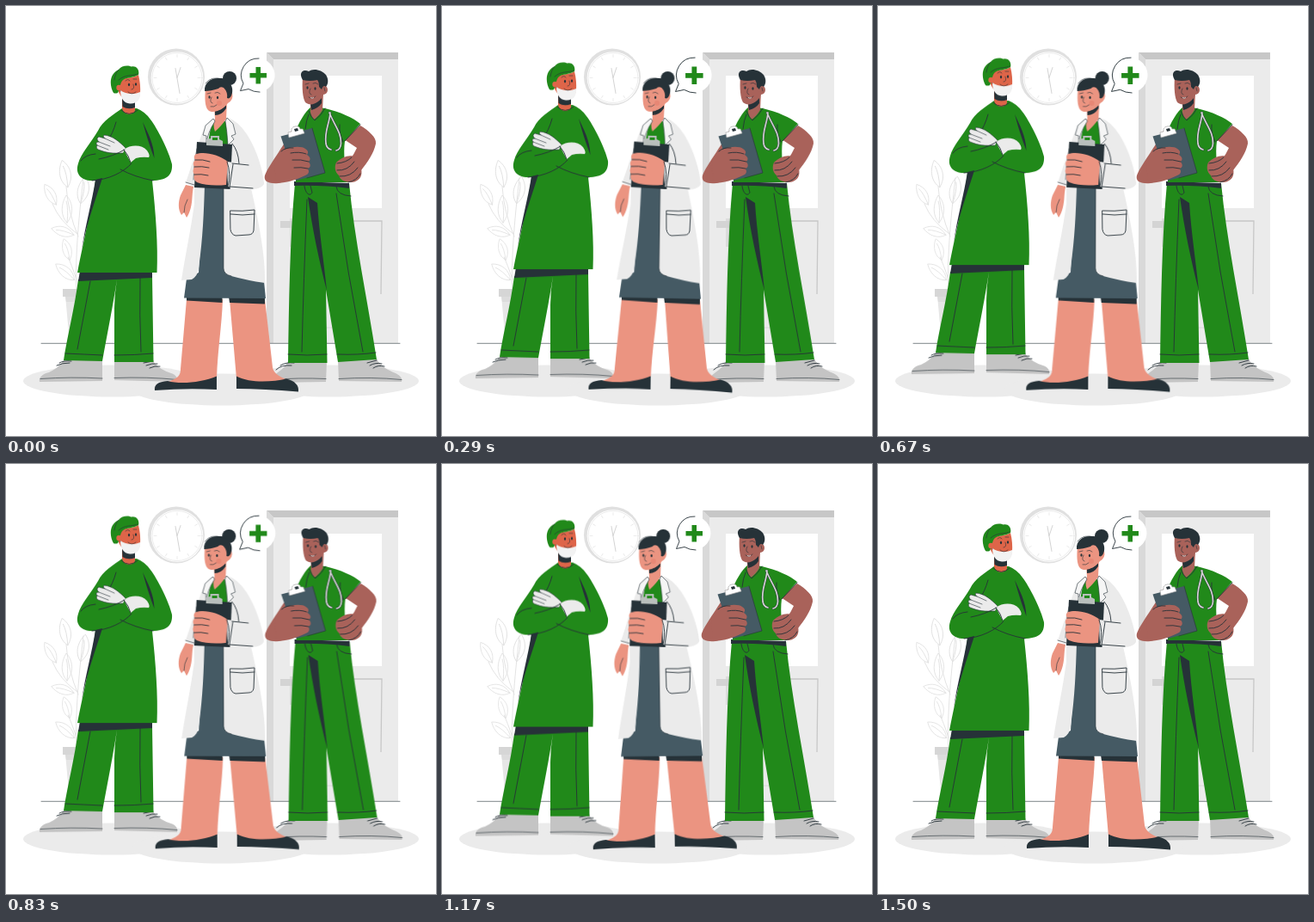
Write an HTML page that moves like this. It is 500 px wide and 500 px high and loops after 1.54 s.

```html
<!DOCTYPE html>
<html lang="en">
<head>
<meta charset="utf-8">
<title>Medical team</title>
<style>
html, body { margin: 0; width: 100%; height: 100%; overflow: hidden; background: #fff; }
svg { display: block; width: 100vw; height: 100vh; }

.green { fill: #21891a; }
.dark { fill: #263238; }
.slate { fill: #455a64; }
.coat { fill: #ebebeb; }
.shoe { fill: #c4c4c4; }
.tan { fill: #de6549; }
.pink { fill: #eb9481; }
.brown { fill: #a9625a; }
.ln { fill: none; stroke: #263238; stroke-width: .9; stroke-linecap: round; stroke-linejoin: round; }
.soft { fill: none; stroke: #e0e0e0; stroke-width: .9; stroke-linecap: round; }
.ln.fine, .soft.fine { stroke-width: .6; }

/* 24 fps over 1.5 s, then a short hold */
.float, .sway, .shake, .beat { animation: 1540ms -4ms infinite linear; }
.float { animation-name: float; animation-timing-function: steps(18); }
.sway { animation-name: sway; transform-origin: 256px 262px; }
.shake { animation-name: shake; }
.beat { animation-name: beat; transform-origin: 292.5px 80px; }

@keyframes float {
  0%, 97.4%, 100% { transform: translateY(0); }
  48.7% { transform: translateY(-10px); }
}
@keyframes sway {
  0%, 97.4%, 100% { transform: rotate(0); }
  24.35% { transform: rotate(1deg); }
  73.05% { transform: rotate(-1deg); }
}
@keyframes shake {
  0%, 97.4%, 100% { transform: translateX(0); }
  9.74%, 87.66% { transform: translateX(-1px); }
  19.48%, 77.92% { transform: translateX(2px); }
  29.22%, 48.7%, 68.18% { transform: translateX(-4px); }
  38.96%, 58.44% { transform: translateX(4px); }
}
@keyframes beat {
  0%, 29.22%, 38.96%, 58.44%, 100% { transform: scale(1); }
  9.74%, 48.7% { transform: scale(1.1); }
}
</style>
</head>
<body>
<svg viewBox="0 0 500 500">
  <defs>
    <path id="leaf" d="M0 16C-9 8-8-6-1-16C8-7 9 6 0 16M0 16Q2 0-1-9"/>
    <g id="ticks"><path id="tick" d="M0-27V-24M0 24V27"/><use href="#tick" transform="rotate(30)"/><use href="#tick" transform="rotate(60)"/></g>
    <path id="tube" d="M377 124C376 138 370 145 372 160Q373 166 378 167M376 124C382 139 390 147 389.500 160Q389 167 384 168"/>
    <ellipse id="shadow" rx="104" ry="18.500"/>
  </defs>

  <!-- room -->
  <g fill="#ebebeb">
    <use href="#shadow" x="124" y="436"/>
    <use href="#shadow" x="376" y="436"/>
    <use href="#shadow" x="251" y="446"/>
    <path d="M303 54H456V392H303Z"/>
  </g>
  <path d="M303 54H456V62H311Z" fill="#c7c7c7"/>
  <path d="M303 54L311 62V392H303Z" fill="#d9d9d9"/>
  <path d="M330 81H437V235H330Z" fill="#fff"/>
  <path d="M330 247H337V280H330Z" fill="#dcdcdc"/>
  <path d="M319 250H336V258H319Z" fill="#d4d4d4"/>
  <path d="M340 250H437L436 335" fill="none" stroke="#c7c7c7" stroke-width="1.3"/>
  <path d="M340 250V374H420" fill="none" stroke="#d6d6d6" stroke-width=".8"/>

  <circle cx="198" cy="82.500" r="33" fill="#e0e0e0"/>
  <circle cx="199" cy="83.500" r="30.300" fill="#fff"/>
  <g class="soft fine" transform="translate(199 83.500)">
    <circle r="29"/>
    <use href="#ticks"/><use href="#ticks" transform="rotate(90)"/>
    <path d="M-2-11L3 18M0 0L4-12" stroke="#cfcfcf" stroke-width=".9"/>
  </g>

  <g class="soft">
    <path d="M82 330C80 300 84 250 90 200M84 268Q72 240 70 210M83 265Q62 250 54 230M82 318Q76 300 72 292"/>
    <use href="#leaf" transform="translate(69 195) rotate(-10)"/>
    <use href="#leaf" transform="translate(52 219) rotate(-28) scale(.85)"/>
    <use href="#leaf" transform="translate(71 236) scale(.9 1)"/>
    <use href="#leaf" transform="translate(90 214) rotate(12)"/>
    <use href="#leaf" transform="translate(66 262) rotate(-72) scale(.85)"/>
    <use href="#leaf" transform="translate(71 283) rotate(-14) scale(.8)"/>
    <use href="#leaf" transform="translate(69 309) rotate(-48) scale(.9)"/>
  </g>
  <path d="M69 337H104L98 392H74Z" fill="#e6e6e6"/>
  <path d="M66 329H108V338H66Z" fill="#d6d6d6"/>
  <path d="M69 338H100L99 344H70Z" fill="#dcdcdc"/>
  <path class="ln fine" d="M41 392.300H458"/>

  <!-- surgeon -->
  <g class="float">
    <path class="shoe" d="M67 412H112V436L39 437C38 432 42 428 50 426Q61 421 67 412ZM126 413H171C176 420 185 425 192 427C198 429 200 433 199 437L126 435Z"/>
    <path class="ln fine" d="M40 433.500Q75 431 112 433M126 432.500Q165 431 199 434.500"/>
    <path class="ln" d="M59 418Q65 415 74 415M62 415Q67 412 76 413M160 415L171 413M163 418Q170 415 176 416M167 421Q173 418 179 419"/>
    <path class="green" d="M84 318L170 314L171.500 414L126 414L126 352Q126 335 129 318C125 345 118 380 112 413L67 412C71 385 80 350 84 318Z"/>
    <path class="ln" d="M69 404Q90 405 112 406M126 406Q150 406 171 404M98 320L83 399M156 316Q155 360 157 402"/>
    <path class="dark" d="M86 308H170V316L84 320Z"/>
    <path class="green" d="M135 119C125 126 112 134 107 145C98 160 87 172 84 183C80 195 87 203 100 203H104C101 228 92 265 83 310H175.500C177 278 174 240 170 203C186 203 194 197 193 184C190 170 176 142 168 132Q162 123 152 119Z"/>
    <path class="dark" d="M104 202L112 200C104 226 94 252 88 284C92 255 100 228 104 202ZM159 135C165 148 172 160 172.500 177C168 165 163 150 159 135Z"/>
    <path class="ln" d="M100 203C120 202 137 193 146 183M133 190Q150 199 171 203M128 135Q124 149 118 157M87 180Q92 173 104 172"/>
    <path class="coat" d="M139 165C131 157 124 151 114 150Q112 152 115 154L108 152Q104 154 108 158Q103 158 106 162Q103 166 110 168C120 172 129 171 136 171Z"/>
    <path class="ln fine" d="M139 165C131 157 124 151 114 150Q112 152 115 154L126 159M115 154L108 152Q104 154 108 158L121 163M108 158Q103 158 106 162L119 167M106 162Q103 166 110 168C120 172 129 171 136 171"/>
    <path class="coat" d="M137 167C145 161 158 161 164 168Q168 174 166 176Q158 175 151 177L145 182Z"/>
    <path class="ln" d="M137 167Q143 174 145 182M108 178Q124 175 138 167"/>

    <path class="tan" d="M135 107H150V119Q151 125 143 126Q136 125 135 119Z"/>
    <path class="dark" d="M135 108L150 110V118Q142 121 135.500 117Z"/>
    <path class="ln" d="M134 121Q143 130 153 121"/>
    <path class="tan" d="M130 87C138 83 148 84 154 80C156 88 156.500 95 156 102C154 112 146 114 140 110C134 107 131 101 130 97Z"/>
    <path fill="#f2f2f2" d="M133 98C139 103 150 103 156 100C157 109 152 114 144 113.500C137 113 133 107 133 98Z"/>
    <path class="ln fine" d="M133 99L130 93M139 87Q142 84 144 87M148 85L152 85M146 97Q150 97 148 91M142 100Q146 104 151 100"/>
    <g class="dark"><ellipse cx="143" cy="91.500" rx="1.100" ry="1.700"/><ellipse cx="151" cy="91" rx="1.100" ry="1.700"/></g>
    <path class="green" d="M125 101C120 92 120 79 131 74C134 69 142 68.500 146 70.500C152 69 155.500 75 154 80C147 84 140 83 136 86C132 90 133 96 130 101Q127 102 125 101Z"/>
    <circle class="tan" cx="131.500" cy="95" r="3.200"/>
    <path class="ln fine" d="M153 79C146 82 139 79 131 86M131 74Q127 78 126 86"/>
  </g>

  <!-- nurse -->
  <g class="shake">
    <path class="shoe" d="M328 413H373L372 437L310 438C309 432 312 429 316 426Q324 421 328 413ZM386 412L431 411C436 419 445 424 453 427C459 430 461 433 460 437L387 436Z"/>
    <path class="ln fine" d="M310 434.500Q340 432 372 433.500M387 433.500Q425 431 460 434.500"/>
    <path class="ln" d="M314 423Q320 417 332 418M319 418Q325 414 335 415M420 415L431 412M423 418Q430 414 437 416M427 421Q433 417 440 419"/>
    <path class="green" d="M336 206H399C405 270 420 340 431 411L386 414L372 330L373.500 415H328C329 345 330 270 336 206Z"/>
    <path class="dark" d="M351 222L362 229C364 262 370 300 373 331C364 296 356 258 351 222ZM335 204L399 206L399 212Q368 208 335 209Z"/>
    <path class="ln" d="M328 405Q350 407 373 405M385 405Q410 406 430 403M350 225Q346 320 344 402M384 218Q397 310 415 402M384 210Q385 220 401 221M347 209C348 218 353 222 356 217L354 209"/>

    <path class="brown" d="M393 155L412 139C422 145 431 153 430 160C428 171 420 182 413 191L399 180Q405 172 408 165Z"/>
    <path class="brown" d="M333 143C322 165 306 184 301 197C299 205 307 207 317 206L345 198L346 160Z"/>
    <path class="green" d="M355 117C347 124 341 134 335 150L337 205H399C394 190 392 172 394 157L412 137C404 130 388 123 371 119Z"/>
    <path class="ln" d="M392 158Q387 148 388 138M348 143Q349 133 352 126M394 157L412 138"/>
    <path class="brown" d="M384 182C391 175 401 172 406 176L413 189C415 198 411 204 402 205C394 205 388 202 387 197C382 193 382 186 384 182Z"/>
    <path class="ln" d="M385 183Q396 182 402 176M385 191Q397 192 405 181M388 198Q401 199 409 188M398 205Q408 203 412 195"/>
    <path class="brown" d="M354 108L369 101L368 121Q364 128 358 132Q353 126 354 120Z"/>
    <path class="dark" d="M354 113Q362 113 367 107V113Q363 119 355 121Z"/>
    <path class="ln" d="M352 122Q355 130 359 133Q367 127 371 119"/>

    <g fill="none" stroke-linecap="round">
      <use href="#tube" stroke="#263238" stroke-width="2.600"/>
      <use href="#tube" stroke="#d4d4d4" stroke-width="1.700"/>
    </g>

    <path class="slate" d="M319.500 151.500L356 142L371 194L337 203Z"/>
    <path class="ln fine" d="M356 142L371 194L350 200"/>
    <path fill="#fff" stroke="#a6a6a6" stroke-width=".7" d="M329 153L328 147L332 146Q331 141 336 140Q341 139 342 143L345 143L347 148Z"/>
    <path class="dark" d="M335 143L339 142L340 145L336 146Z"/>
    <path class="brown" d="M312 180C316 173 320 168 326 166C334 163 345 163 348 166Q353 169 350 173Q356 177 352 181Q356 187 351 189Q354 195 348 197C338 202 325 206 314 206Z"/>
    <path class="ln" d="M349 172Q341 169 331 171M352 181Q343 178 333 179M351 189Q343 187 335 188M320 169Q325 164 334 165"/>

    <path class="brown" d="M345 83C344 96 345 107 348 112C355 118 365 112 369 103C375 103 376 94 370 92L366 82Z"/>
    <path class="dark" d="M345 86C340 78 345 73 352 76C357 72 367 74 372 80C376 86 374 92 372 94Q369 91 367 97L364 94Q364 88 362 86Q353 88 345 86Z"/>
    <path class="ln fine" d="M348 91L352 90M357 90Q360 88 363 91M354 96Q351 102 355 103M352 106Q356 109 360 105M370 95L371 99"/>
    <g class="dark"><ellipse cx="350.500" cy="95" rx="1.100" ry="1.700"/><ellipse cx="359.500" cy="96" rx="1.100" ry="1.700"/></g>
    <path d="M354 106.500Q356 108 358 106.500" stroke="#fff" stroke-width=".7" fill="none"/>
  </g>

  <!-- doctor -->
  <g class="sway">
    <path class="pink" d="M210 341H252C251 372 246 400 245 433Q220 445 186 438C200 433 203 430 203 422ZM260 341H301L310 420Q311 429 328 435Q300 444 268 433Z"/>
    <path class="dark" d="M173 447C172 440 177 437 188 436C202 440 228 438 245 430.500V446Q210 444 173 447ZM268 430.500C284 439 310 437 326 433.500C336 436 341 441 340 448.500Q300 445 268 445ZM210 338H251.500V345L210 342.500ZM259 338H301V346.500L260 345Z"/>
    <path class="slate" d="M230 208H257L256 310L300 320L302 340L207 339.500L210 317L224 310Z"/>

    <path class="pink" d="M209 208L218 210C216 220 217 226 215 234Q213 242 210 246L207 240L204 243C200 237 200 228 203 220Z"/>
    <path class="ln fine" d="M211 225Q207 232 207 240"/>
    <path class="coat" d="M240 131C231 137 227 150 222 166C217 182 212 196 209 206L219 210L219 230C215 260 208 292 204 319L216 318Q223 314 224 305C229 270 230 240 231 208L253 208V305Q253 312 262 314Q280 319 301 322C302 290 293 247 285 212Q297 213 300 207C299 191 292 168 280 149Q270 134 258 130Z"/>
    <path class="ln fine" d="M209 205L219 208M222 166Q219 181 218 202M253 212V305Q253 312 262 314"/>
    <path class="green" d="M241 134L258 134L262 142L258 162H235Q236 146 241 134Z"/>
    <path class="pink" d="M242 118L257 110L256 131Q252 138 243 146Q240 138 243 131Z"/>
    <path class="dark" d="M243 122Q250 122 256 115L256 119Q251 127 243 127Z"/>
    <path fill="#f5f5f5" stroke="#263238" stroke-width=".6" stroke-linejoin="round" d="M241 131L232 139L229 150L233 151L233 160Q234 148 243 134ZM257 130L264 137L267 149L262 151L265 155L258 162Q257 145 255 134Z"/>

    <path class="dark" d="M222 158L263 161L260.500 213L219 211Z"/>
    <path fill="#b9bfbc" d="M233 162V155L238 154V151H248V155L252 157V163Z"/>
    <path class="green" d="M240 153H246V156H240Z"/>
    <path class="coat" d="M257 181L282 184L300 205Q298 213 286 213L258 210Z"/>
    <path class="pink" d="M258 181C247 172 230 169 221 172Q217 175 220 179Q216 183 219 187Q216 192 219 196Q217 202 222 205C232 209 245 209 256 208Z"/>
    <path class="ln" d="M220 179Q229 178 237 181M219 187Q228 186 236 188M219 196Q227 195 235 197M257 181Q262 195 258 210M263 183L282 185M264 184L260 210L287 212M263 160Q270 168 271 183"/>
    <path class="ln" d="M261 238Q275 239 289 237L288 261Q287 266 282 266L267 267Q262 266 261 260ZM261 242Q275 244 289 242"/>

    <path class="pink" d="M232 96C231 106 231 117 235 121C240 126 252 121 258 113Q265 109 263 101L254 90Z"/>
    <circle class="dark" cx="260" cy="84" r="8"/>
    <path class="dark" d="M231 99C230 89 239 83 248 84C257 83 265 92 263 101Q261 109 257 107Q258 100 253 95Q249 93 247 96Q238 99 231 99Z"/>
    <path class="ln fine" d="M232 90Q238 81 252 85M256 80Q261 75 266 80M234 102L238 101M243 101Q246 99 249 102M239 106Q236 112 240 113M238 117Q242 118 245 115"/>
    <g class="dark"><ellipse cx="236.500" cy="106" rx="1.100" ry="1.700"/><ellipse cx="246" cy="106.500" rx="1.100" ry="1.700"/></g>
    <circle cx="248" cy="113" r="3" fill="#e0705f" opacity=".35"/>
  </g>

  <!-- speech bubble -->
  <g class="beat">
    <path d="M272.500 98.500L276 90A19.500 19.500 0 1 1 282 96.500Z" fill="#fff"/>
    <path class="ln" d="M294 61A19.500 19.500 0 0 0 276 90L272.500 98.500L282 96.500Q288 100 295 100"/>
    <path class="green" d="M290.500 71H296V78H303V83.500H296V90.500H290.500V83.500H283.500V78H290.500Z"/>
  </g>
</svg>
</body>
</html>
```
